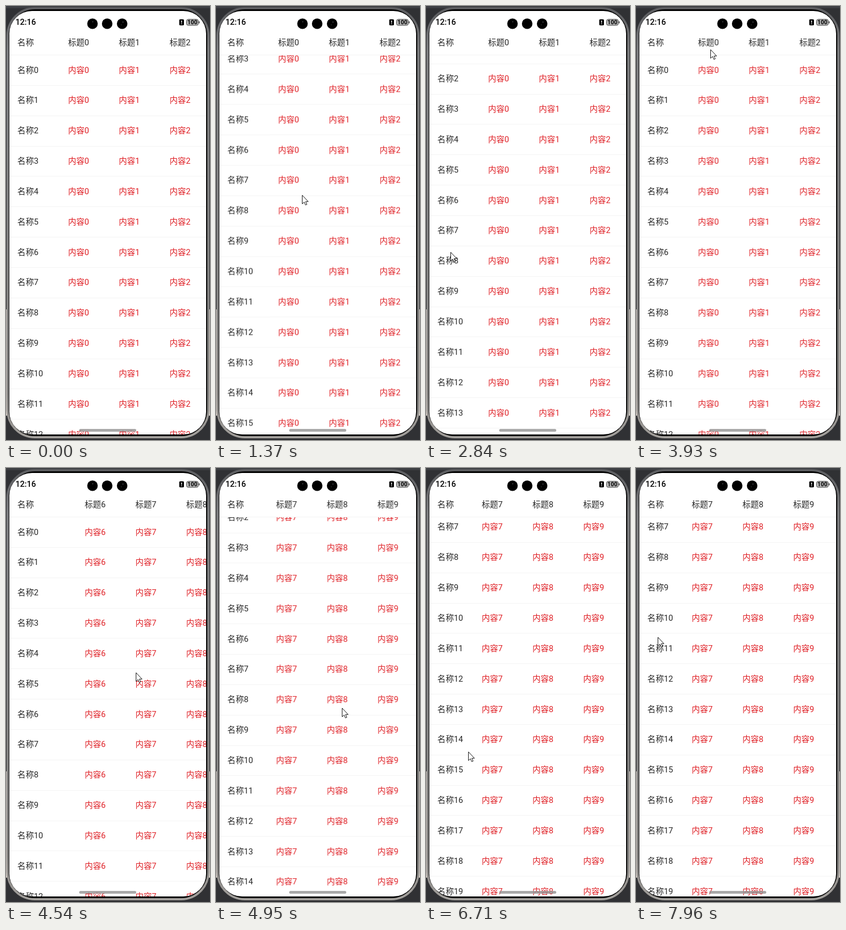
These frames come from a looping animation (368 by 784 pixels, 8000 ms). An HTML page:

```html
<!DOCTYPE html>
<html lang="zh-CN">
<head>
<meta charset="utf-8">
<title>Table scroll</title>
<style>
html, body { margin: 0; width: 100%; height: 100%; overflow: hidden; background: #303134; }
#stage { position: relative; width: 368px; height: 784px; overflow: hidden;
  font: 14.8px/20px Roboto, 'Noto Sans CJK SC', 'Noto Sans CJK JP', sans-serif; color: #262626; }
#stage svg, #stage div { position: absolute; }
#screen { left: 6px; top: 9px; width: 355px; height: 765px; border-radius: 41px; overflow: hidden; background: #fff; }
.clip { overflow: hidden; }
#corner, #head { top: 40px; height: 39px; }
#names, #cells { top: 79px; height: 686px; }
#corner, #names { left: 0; width: 91.4px; }
#head, #cells { left: 91.4px; width: 264px; }
.move { left: 0; top: 0; will-change: transform; }
.text { white-space: nowrap; }
#cells .text { color: #df2026; }
.line { left: 0; height: 1px; background: #f4f4f4; }
#rule { top: 79px; width: 355px; }
#time { left: 11px; top: 10px; font-size: 14.6px; font-weight: 500; color: #000; }
#bar { left: 126px; top: 755px; width: 103px; height: 5px; border-radius: 3px;
  background: rgba(140, 140, 140, .75); backdrop-filter: blur(6px); }
</style>
</head>
<body>
<div id="stage">
  <svg width="368" height="784">
    <defs>
      <linearGradient id="rim" x2="0" y2="1">
        <stop offset="0" stop-color="#5c5d60"/>
        <stop offset=".1" stop-color="#7c7d7f"/>
        <stop offset=".9" stop-color="#858482"/>
        <stop offset="1" stop-color="#a3a09c"/>
      </linearGradient>
    </defs>
    <path d="M0 0H368V4H0Z" fill="#3d3f43"/>
    <path d="M0 548H368V740H0Z" fill="#d3cbc4"/>
    <rect x="3" y="4" width="362" height="775" rx="49" stroke="url(#rim)" stroke-width="4"/>
  </svg>
  <div id="screen">
    <div id="corner"><div class="text" style="left:14.6px;top:7px">名称</div></div>
    <div id="head" class="clip"><div class="move"></div></div>
    <div id="names" class="clip"><div class="move"></div></div>
    <div id="cells" class="clip"><div class="move"></div></div>
    <div id="rule" class="line"></div>
    <div id="time">12:16</div>
    <div id="bar"></div>
  </div>
  <svg width="368" height="60">
    <circle cx="156" cy="32" r="9.5"/>
    <circle cx="182.5" cy="32" r="9.5"/>
    <circle cx="209.5" cy="32" r="9.5"/>
    <g fill="#4a4d52">
      <circle cx="156.5" cy="28.5" r="1"/><circle cx="211" cy="29" r="1"/><circle cx="208" cy="34" r=".7"/>
    </g>
    <rect x="312.5" y="24" width="8.5" height="11" rx="1.8"/>
    <path d="M316.7 26.3V30.3M316.7 31.5V33" stroke="#fff" stroke-width="1.4"/>
    <rect x="325.5" y="24" width="21.5" height="11" rx="3.5" fill="#b5b5b5" stroke="#4a4a4a"/>
    <rect x="347.8" y="27.5" width="1.4" height="4" rx=".7" fill="#333"/>
    <text x="336.2" y="33.2" text-anchor="middle" font-size="10.4" font-weight="700">100</text>
  </svg>
  <svg id="cursor" width="14" height="21" style="left:0;top:0">
    <path d="M.6 .8V16.4L4.2 13.2L6.5 18.5L9 17.4L6.7 12.3H11.4Z" fill="#fff" stroke="#111"/>
  </svg>
</div>
<script>
const LOOP = 8000, TICK = 77.3;
const ROW = 54.85, COL = 91.5, ROWS = 20, COLS = 10;
const MAX_X = 652, MAX_Y = 393;

// Pointer strokes: arrival time, duration, x, y; it rests in between
const strokes = [
  [290, 290, 218, 382], [680, 150, 206, 279], [1140, 150, 212, 443],
  [1530, 300, 110, 260], [1770, 240, 66, 374],
  [2400, 500, 48, 570], [2860, 460, 44, 444], [3160, 300, 12, 330],
  [3540, 380, 281, 80], [3940, 200, 134, 78],
  [4560, 600, 234, 369], [4860, 300, 232, 490], [5100, 240, 215, 300], [5490, 390, 207, 441],
  [6030, 540, 170, 297], [6500, 470, 130, 601], [6950, 450, 23, 424],
  [7190, 150, 39, 413], [7500, 230, 60, 617], [7960, 460, 39, 305]
];

const $ = id => document.getElementById(id);
const [head, names, cells] = ['head', 'names', 'cells'].map(id => $(id).firstElementChild);
const cursor = $('cursor');

function add(parent, cls, x, y, text = '') {
  const el = document.createElement('div');
  el.className = cls;
  el.style.left = x + 'px';
  el.style.top = y + 'px';
  el.textContent = text;
  parent.append(el);
  return el;
}

function addColumns(parent, y, label) {
  for (let c = 0; c < COLS; c++) add(parent, 'text', c * COL + 15, y, label + c);
}

addColumns(head, 7, '标题');
for (let r = 0; r < ROWS; r++) {
  const y = r * ROW;
  add(names, 'text', 14.6, y + 17.5, '名称' + r);
  add(names, 'line', 0, y).style.width = '92px';
  add(cells, 'line', 0, y).style.width = COLS * COL + 'px';
  addColumns(cells, y + 17.5, '内容');
}

const progress = (t, from, to) => Math.min(1, Math.max(0, (t - from) / (to - from)));

// Decelerating fling, 0 to 1
const fling = (t, from, to) => 1 - (1 - progress(t, from, to)) ** 2;

function pointer(t) {
  let x = 310, y = 800;
  for (const [end, time, toX, toY] of strokes) {
    const u = progress(t, end - time, end), k = u * u * (3 - 2 * u);
    x += (toX - x) * k;
    y += (toY - y) * k;
  }
  return [Math.round(x), Math.round(y)];
}

const shift = (el, x, y) => { el.style.transform = `translate(${x}px, ${y}px)`; };

function draw(now) {
  // The picture updates about 13 times a second
  const t = Math.floor((now % LOOP) / TICK + 0.3) * TICK;
  const x = MAX_X * fling(t, 3942, 5070);
  const y = MAX_Y * (fling(t, 1250, 1770) - fling(t, 2240, 3453) + fling(t, 4820, 5485));
  shift(head, -x, 0);
  shift(names, 0, -y);
  shift(cells, -x, -y);
  shift(cursor, ...pointer(t));
}

let start;
function frame(now) {
  start ??= now;
  draw(now - start);
  requestAnimationFrame(frame);
}
draw(0);
requestAnimationFrame(frame);
</script>
</body>
</html>
```
